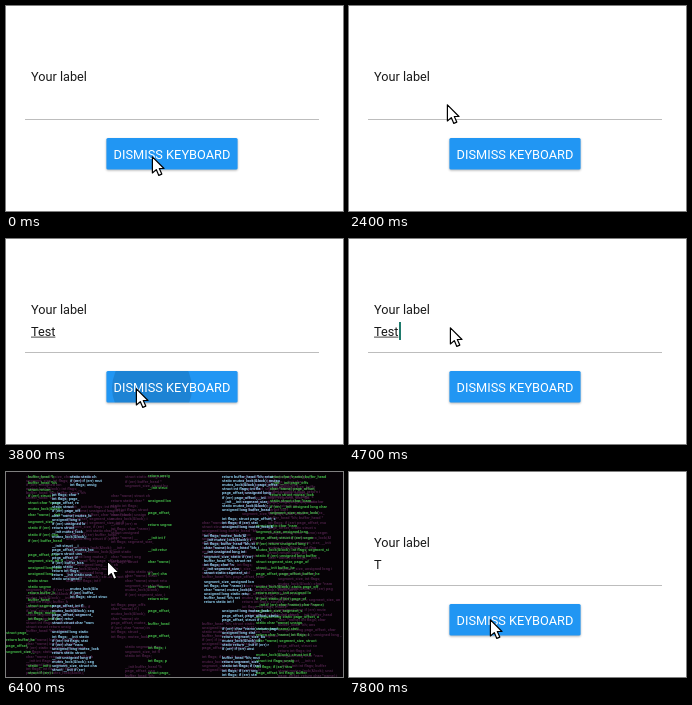
An HTML page for the animation above (8 s loop, 337 by 205 pixels).

```html
<!DOCTYPE html>
<html lang="en">
<head>
<meta charset="utf-8">
<title>Floating label</title>
<style>
  html, body { margin: 0; width: 100%; height: 100%; overflow: hidden; background: #fff; }
  svg { display: block; width: 337px; height: 205px; }
  text { font-family: Roboto, Arial, sans-serif; fill: #1a1a1a; white-space: pre; }
  #button { fill: #2196f3; filter: drop-shadow(0 1px 1.2px rgba(0, 0, 0, .3)); }
  #code text { font-size: 4px; font-weight: 700; }
  #code .plum { fill: #4a2045; }
  #code .green { fill: #43b848; }
  #code .blue { fill: #8fd0f0; }
</style>
</head>
<body>
<svg viewBox="0 0 337 205">
  <clipPath id="face"><rect x="100.4" y="132" width="131.2" height="31.5" rx="1.5"/></clipPath>
  <rect width="337" height="205" fill="#fff"/>
  <text id="label" x="25">Your label</text>
  <text id="value" x="25" y="97" font-size="12.7"></text>
  <rect id="under" x="25" y="97.6" height="1" fill="#444"/>
  <rect id="caret" y="83" width="2" height="18" fill="#1f7a6c"/>
  <rect x="19" y="113" width="294" height="1" fill="#bdbdbd"/>
  <rect id="button" x="100.4" y="132" width="131.2" height="31.5" rx="1.5"/>
  <g clip-path="url(#face)"><circle id="ripple" cy="149"/></g>
  <text x="107.6" y="153" style="fill: #fff" font-size="12.8">DISMISS KEYBOARD</text>
  <g id="code"><rect width="337" height="205" fill="#060206"/></g>
  <path id="pointer" d="M.4 .8V17L4.3 13.6L6.8 19.4L9.8 18.1L7.3 12.5H12Z"
    fill="#fff" stroke="#000" stroke-width="1.2" stroke-linejoin="round"/>
</svg>
<script>
const LOOP = 8000, STEP = 100;
const [label, value, under, caret, ripple, code, pointer] =
  ['label', 'value', 'under', 'caret', 'ripple', 'code', 'pointer']
    .map(id => document.getElementById(id));

const focused = [1900, 4700];
const typed = [2600, 2800, 3000, 3100];
const erased = [5800, 6100, 7100];
const taps = [{ time: 500, x: 146, r: 27 }, { time: 3800, x: 146, r: 40 }, { time: 7600, x: 150, r: 55 }];

// start, end, x, y
const moves = [
  [500, 900, 108, 107], [1500, 1700, 98, 98], [3100, 3600, 130, 149],
  [3900, 4500, 101, 88], [6600, 6700, 122, 93], [7100, 7400, 141, 147]
];

const past = (times, t) => times.filter(time => time <= t);

function ramp(t, from, to) {
  const p = Math.min(1, Math.max(0, (t - from) / (to - from)));
  return p * p * (3 - 2 * p);
}

function set(node, attrs) {
  for (const name in attrs) node.setAttribute(name, attrs[name]);
}

function drawPointer(t) {
  let x = 146, y = 150;
  for (const [from, to, toX, toY] of moves) {
    const p = ramp(t, from, to);
    x += (toX - x) * p;
    y += (toY - y) * p;
  }
  set(pointer, { transform: `translate(${Math.round(x)} ${Math.round(y)})` });
}

function drawField(t) {
  const large = ramp(t, 500, 800) - ramp(t, 2000, 2300);
  set(label, { y: 75 + 23 * large, 'font-size': 12.7 + 3.75 * large });

  const count = past(typed, t).length - past(erased, t).length;
  value.textContent = 'Test'.slice(0, count);
  const width = value.getComputedTextLength();

  const blurs = taps.map(tap => tap.time + STEP);
  const active = Math.max(0, ...past(focused, t)) > Math.max(0, ...past(blurs, t));
  const lastInput = Math.max(...past([...focused, ...typed, ...erased], t));
  set(under, { width: active ? width : 0 });
  set(caret, { x: Math.round(25.3 + width), opacity: active && t - lastInput < 500 ? 1 : 0 });
}

function drawRipple(t) {
  const tap = taps.findLast(({ time }) => time <= t);
  const fade = tap ? Math.max(0, 1 - (t - tap.time) / 200) : 0;
  set(ripple, { cx: tap ? tap.x : 0, r: tap ? tap.r : 0, opacity: .13 * fade });
}

function buildCode() {
  let seed = 41;
  const rnd = () => (seed = seed * 16807 % 2147483647) / 2147483647;
  const words = ['struct', 'buffer_head *bh;', 'unsigned long', 'int flags;', 'return', 'if (err)',
    'mutex_lock(&lock);', 'page_offset,', '__init', 'static', 'segment_size,', 'char *name)'];

  function addLine(ink, x, y, width) {
    let line = '';
    while (line.length < width / 2) line += words[Math.floor(rnd() * words.length)] + ' ';
    const row = document.createElementNS('http://www.w3.org/2000/svg', 'text');
    set(row, { class: ink, x, y });
    row.textContent = line.slice(0, Math.ceil(width / 2.1));
    code.append(row);
  }

  // Paragraphs of random length and indent, with a gap after each.
  function addColumn(ink, x, width, step, indent) {
    let y = 6;
    while (y < 207) {
      const left = x + indent * Math.round(rnd());
      const end = y + step * (2 + 9 * rnd());
      for (; y < end; y += step) addLine(ink, left, y, width * (.55 + .45 * rnd()));
      y += step * 1.2;
    }
  }

  addColumn('plum', 20, 75, 4.1, 40);
  addColumn('plum', 105, 50, 4.6, 14);
  addColumn('plum', 196, 85, 4.1, 40);
  addColumn('plum', 262, 75, 5, 10);
  addColumn('green', 0, 42, 6.4, 22);
  addColumn('green', 250, 84, 6, 14);
  addColumn('blue', 46, 50, 4.2, 18);
  addColumn('blue', 198, 66, 4.1, 18);
  for (let y = 5; y < 205; y += 12.3) addLine('green', 142, y, 24);
}

function draw() {
  const t = Math.floor(performance.now() % LOOP / STEP) * STEP;
  drawPointer(t);
  drawField(t);
  drawRipple(t);
  code.style.display = t === 6400 ? '' : 'none';
  requestAnimationFrame(draw);
}

buildCode();
draw();
</script>
</body>
</html>
```
